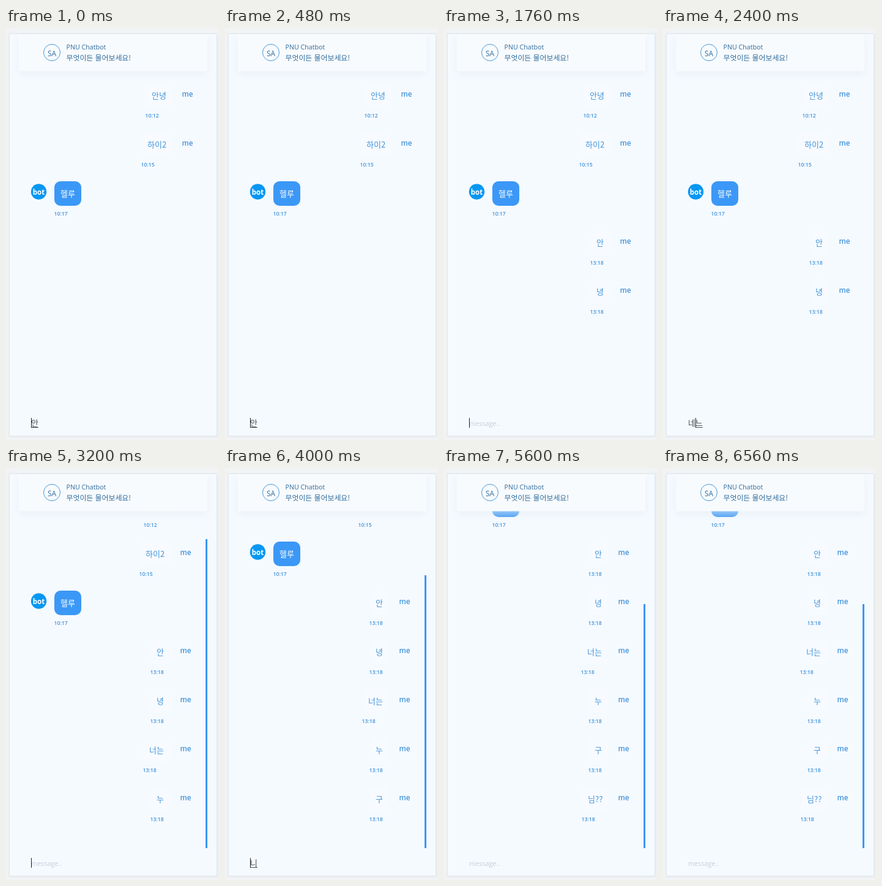
An HTML page that plays this animation: 348x672 px, repeating every 7200 ms.

```html
<!DOCTYPE html>
<html lang="ko">
<head>
<meta charset="utf-8">
<title>Chatbot</title>
<style>
  html, body { margin: 0; width: 100%; height: 100%; overflow: hidden; background: #f2f3f4; }
  svg { display: block; }
  text { font-family: "Open Sans", "Noto Sans CJK KR", "Noto Sans CJK", sans-serif; fill: #4394d9; white-space: pre; }
  .ko { font-family: "Noto Sans CJK KR", "Noto Sans CJK", sans-serif; font-size: 13px; font-weight: 300; }
  .who { font-size: 11.8px; font-weight: 600; }
  .bot { font-size: 11.5px; font-weight: 700; fill: #fff; text-anchor: middle; }
  .time { font-size: 8.7px; font-weight: 600; }
  .head { font-size: 10.7px; fill: #306c9b; }
  .head.ko { font-size: 11.9px; font-weight: 400; }
  .sa { font-size: 12px; fill: #306c9b; text-anchor: middle; }
  .typed { fill: #4b5359; }
  .hint { font-size: 10.8px; fill: #c4ced7; }
  .white { fill: #fff; font-weight: 400; }
</style>
</head>
<body>
<svg id="stage" width="348" height="672" viewBox="0 0 348 672">
  <defs>
    <clipPath id="view"><rect x="6" y="70" width="339" height="550"/></clipPath>
    <filter id="soft" x="-20%" y="-40%" width="140%" height="200%"><feGaussianBlur stdDeviation="7"/></filter>
    <filter id="edge" x="-10%" y="-10%" width="120%" height="120%"><feGaussianBlur stdDeviation="2"/></filter>
    <clipPath id="card"><rect x="6" y="10" width="339" height="655"/></clipPath>
  </defs>
  <rect x="5" y="10" width="341" height="657" fill="#dce1e6" opacity=".65" filter="url(#edge)"/>
  <rect x="5.5" y="9.5" width="339" height="656" fill="#f5faff" stroke="#dfe7ef"/>
  <g clip-path="url(#view)"><g id="list"></g></g>
  <g clip-path="url(#card)">
    <rect x="21" y="16" width="308" height="60" fill="#e3ebf3" opacity=".65" filter="url(#soft)"/>
    <rect x="21" y="10" width="308" height="60.5" fill="#f8fbfe"/>
  </g>
  <circle cx="75" cy="40" r="13.5" fill="none" stroke="#4798d7"/>
  <text class="sa" x="75" y="45.5">SA</text>
  <text class="head" x="98.5" y="35">PNU Chatbot</text>
  <text class="head ko" x="98.5" y="53">무엇이든 물어보세요!</text>
  <rect id="bar" x="326" width="3" fill="#3b97f2"/>
  <text id="hint" class="hint" x="41" y="649">message..</text>
  <text id="typed" class="typed ko" x="41" y="649"></text>
  <rect id="under" y="651" height="1" fill="#4b5359"/>
  <rect id="caret" y="636" width="1" height="16" fill="#222"/>
</svg>
<script>
const $ = id => document.getElementById(id);
const LOOP = 7200, VIEW = 550, BOTTOM = 620, ROW = 80;

// text, time, left edge of the bubble, sent by the bot
const messages = [
  ["안녕", "10:12", 228],
  ["하이2", "10:15", 221],
  ["헬루", "10:17", 79, true],
  ["안", "13:18", 239],
  ["녕", "13:18", 239],
  ["너는", "13:18", 227],
  ["누", "13:18", 239],
  ["구", "13:18", 239],
  ["님??", "13:18", 228]
];

// at: start in ms, n: messages sent, under: left edge of the syllable being composed
const steps = [
  { at: 0, n: 3, text: "안", caret: 41, under: 41 },
  { at: 800, n: 5, text: "", caret: 41 },
  { at: 2400, n: 5, text: "네느", caret: 53, under: 53 },
  { at: 3200, n: 7, text: "", caret: 41 },
  { at: 4000, n: 8, text: "니", caret: 41, under: 41 },
  { at: 4800, n: 8, text: "님?", caret: 58 },
  { at: 5600, n: 9, text: "" }
];

function add(parent, tag, attrs, text = "") {
  const el = document.createElementNS("http://www.w3.org/2000/svg", tag);
  for (const key in attrs) el.setAttribute(key, attrs[key]);
  el.textContent = text;
  return parent.appendChild(el);
}

const rows = messages.map(([text, time, left, bot], i) => {
  const y = 110 + ROW * i;
  const g = add($("list"), "g", {});
  add(g, "rect", {
    x: left, y: y - 20, width: bot ? 44 : 271 - left, height: 40, rx: 10,
    fill: bot ? "#3b98f6" : "#f7fbff"
  });
  add(g, "text", { class: bot ? "ko white" : "ko", x: left + 10, y: y + 5 }, text);
  add(g, "text", { class: "time", x: left - .5, y: y + 36 }, time);
  if (bot) {
    add(g, "circle", { cx: 53.5, cy: y - 3, r: 12.7, fill: "#0797f2" });
    add(g, "text", { class: "bot", x: 53.5, y: y + 2 }, "bot");
  } else {
    add(g, "text", { class: "who", x: 287.5, y: y + 2 }, "me");
  }
  return g;
});

const show = (el, on) => el.setAttribute("visibility", on ? "visible" : "hidden");

function place(el, x) {
  show(el, x !== undefined);
  if (x !== undefined) el.setAttribute("x", x);
}

function render(step) {
  const scroll = Math.max(0, ROW * step.n + 40 - VIEW);
  const thumb = Math.round(VIEW * VIEW / (VIEW + scroll));
  rows.forEach((row, i) => {
    show(row, i < step.n);
    // the scrollbar narrows the list, which shifts only the right-hand column
    const dx = scroll && !messages[i][3] ? -3 : 0;
    row.setAttribute("transform", `translate(${dx} ${-scroll})`);
  });
  show($("bar"), scroll > 0);
  $("bar").setAttribute("y", BOTTOM - thumb);
  $("bar").setAttribute("height", thumb);
  $("typed").textContent = step.text;
  show($("hint"), !step.text);
  place($("caret"), step.caret);
  place($("under"), step.under);
  $("under").setAttribute("width", 12);
}

let current;
const start = performance.now();
function tick() {
  const t = Math.max(0, performance.now() - start) % LOOP;
  const step = steps.findLast(s => s.at <= t);
  if (step !== current) render(current = step);
  requestAnimationFrame(tick);
}
tick();
</script>
</body>
</html>
```
